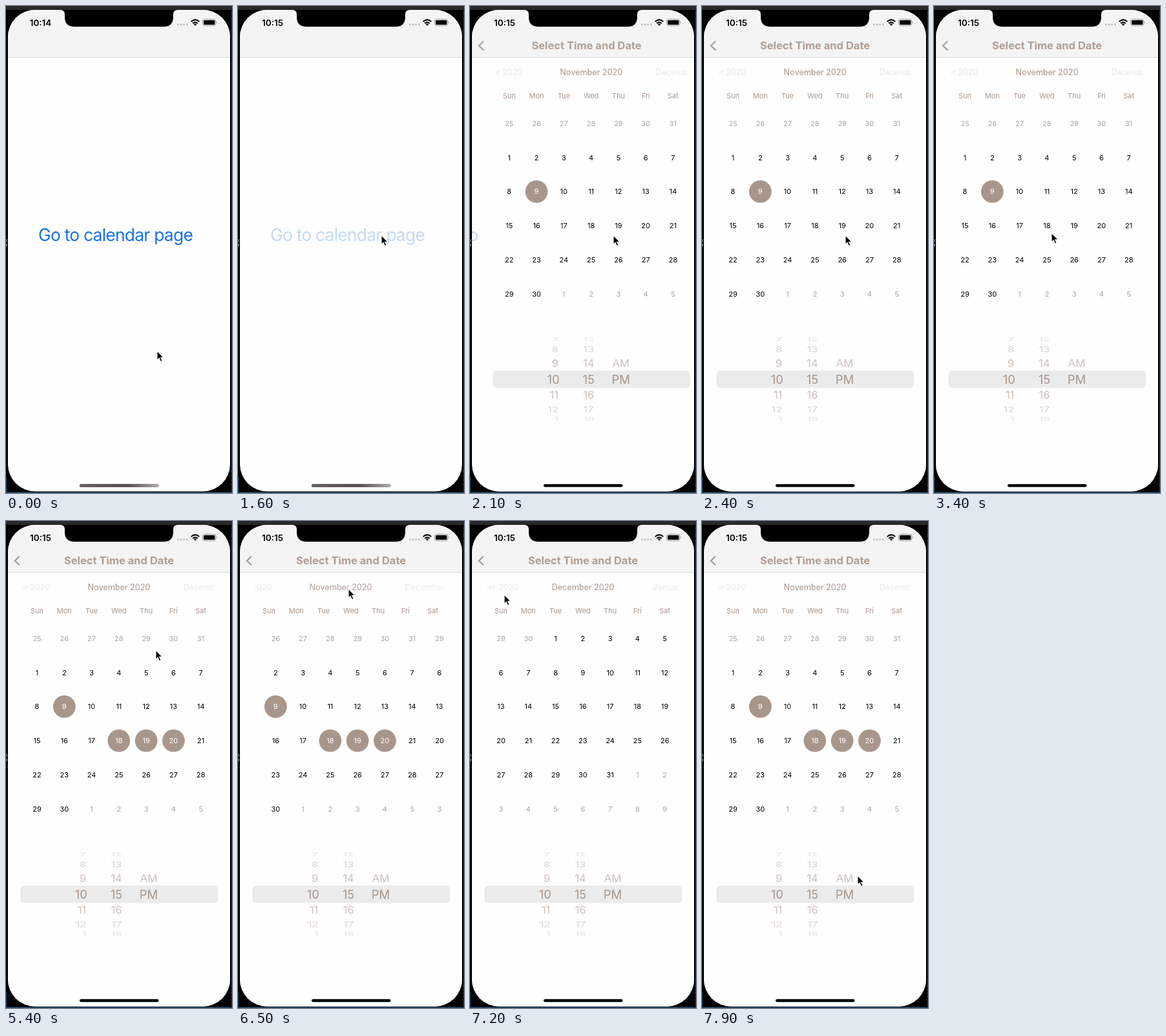
An HTML page for the animation above (8000 ms loop, 350 by 754 pixels).

```html
<!DOCTYPE html>
<html lang="en">
<head>
<meta charset="utf-8">
<title>Calendar page</title>
<style>
html, body { margin: 0; width: 100%; height: 100%; overflow: hidden; background: #000; }
svg { display: block; width: 350px; height: 754px; }
text { font-family: Inter, Roboto, sans-serif; font-optical-sizing: none; }
</style>
</head>
<body>
<svg id="stage" viewBox="0 0 350 754" xmlns="http://www.w3.org/2000/svg">
  <defs>
    <clipPath id="screen"><rect x="3" y="6" width="344" height="745.5" rx="42"/></clipPath>
    <clipPath id="months"><rect x="27" y="90" width="296" height="400"/></clipPath>
    <linearGradient id="barFill">
      <stop offset="0" stop-color="#6a6263"/>
      <stop offset=".6" stop-color="#574f50"/>
      <stop offset="1" stop-color="#b5b1b1"/>
    </linearGradient>
  </defs>
  <rect width="350" height="754"/>
  <rect width="350" height="6" fill="#292929"/>
  <rect y="752.5" width="350" height="1.5" fill="#234f70"/>
  <rect y="730" width="1" height="24" fill="#234f70"/>
  <path d="M1 361v4m0 3v4" stroke="#aaa"/>
  <path d="M349.5 6V752" stroke="#333"/>
  <g clip-path="url(#screen)">
    <rect x="3" y="6" width="344" height="747" fill="#fefefe"/>
    <g id="home"></g>
    <g id="calendar"><rect x="3" y="79" width="344" height="674" fill="#fefefe"/></g>
    <rect x="3" y="6" width="344" height="73" fill="#f4f4f4"/>
    <path d="M3 79.5H347" stroke="#d9d9d9"/>
    <path id="back" d="M21 54.5L14 61.5L21 68.5" fill="none" stroke="#a0958f" stroke-width="2"/>
    <g id="title"></g>
    <path d="M84 6Q91 6 91 13V17Q91 32 106 32H244Q259 32 259 17V13Q259 6 266 6Z"/>
    <g id="status">
      <g fill="none" stroke="#000" stroke-width="2.2">
        <path d="M286.8 24.2Q293 18.6 299.2 24.2"/>
        <path d="M289.3 27Q293 23.8 296.7 27"/>
      </g>
      <path d="M290.7 28.3Q293 26.6 295.3 28.3L293 30.8Z"/>
      <rect x="304.5" y="20.5" width="20.5" height="10" rx="3" fill="none" stroke="#999"/>
      <rect x="306" y="22" width="17.5" height="7" rx="1.6"/>
      <path d="M326.2 23.7Q328 25.5 326.2 27.3Z" fill="#999"/>
    </g>
    <rect id="bar" x="114" y="740.3" width="122.5" height="4.4" rx="2.2"/>
    <rect id="barTint" x="114" y="740.3" width="122.5" height="4.4" rx="2.2" fill="url(#barFill)"/>
  </g>
  <path id="pointer" d="M0 0V14.2L3.2 11.3L5.5 16.7L8 15.6L5.7 10.4H10.2Z" stroke="#fff" stroke-width="1.1"/>
</svg>
<script>
const LOOP = 8000, STEP = 100;
const BROWN = '#a9968b', PAGE = 296, COL = PAGE / 7, ROW = 52.7;
const $ = id => document.getElementById(id);

function el(tag, attrs, parent, text) {
  const node = document.createElementNS('http://www.w3.org/2000/svg', tag);
  for (const k in attrs) node.setAttribute(k, attrs[k]);
  if (text !== undefined) node.textContent = text;
  return parent.appendChild(node);
}
const label = (parent, text, x, y, size, fill, more) =>
  el('text', { x, y, 'font-size': size, fill, 'text-anchor': 'middle', ...more }, parent, text);
const move = (node, x, y = 0) => node.setAttribute('transform', `translate(${x} ${y})`);
const fade = (node, a) => node.setAttribute('opacity', a);
const clamp = v => Math.max(0, Math.min(1, v));

// Linear keys: [time, ...values]
function at(keys, t) {
  let i = 0;
  while (i < keys.length - 2 && t >= keys[i + 1][0]) i++;
  const [t0, ...a] = keys[i], [t1, ...b] = keys[i + 1];
  const k = clamp((t - t0) / (t1 - t0));
  return a.map((v, j) => v + (b[j] - v) * k);
}

// Home page, navigation and status bar
const link = label($('home'), 'Go to calendar page', 169.5, 363.7, 26.5, '#1a73e0', { 'letter-spacing': -0.8 });
label($('title'), 'Select Time and Date', 175, 66.5, 16.5, '#b09d92', { 'font-weight': 700 });
const clock = label($('status'), '', 53.5, 30.5, 13.5, '#000', { 'font-weight': 600 });
for (let i = 0; i < 4; i++) el('circle', { cx: 266.5 + i * 4.6, cy: 28.7, r: 1.4, fill: '#bbb' }, $('status'));

// Month header and weekdays
const calendar = $('calendar');
const clipped = el('g', { 'clip-path': 'url(#months)' }, calendar);
const heads = el('g', {}, clipped);
const names = ['October 2020', 'November 2020', 'December 2020', 'January 2021'].map((name, i) =>
  label(heads, name, 175 + (i - 1) * PAGE / 2, 107.3, 12.8, BROWN, { 'letter-spacing': -0.1 }));
const colX = c => 48 + c * COL;
['Sun', 'Mon', 'Tue', 'Wed', 'Thu', 'Fri', 'Sat'].forEach((d, c) =>
  label(calendar, d, colX(c), 143, 11, BROWN));

// Day grid, two month pages side by side
const days = el('g', {}, clipped);
const picks = { 9: -1000, 18: 4000, 19: 4600, 20: 5100 };
const marks = [];
[[10, -6], [11, -1]].forEach(([month, first], page) => {
  for (let i = 0; i < 42; i++) {
    const date = new Date(2020, month, first + i + 0);
    const x = colX(i % 7) + page * PAGE, y = 182 + Math.floor(i / 7) * ROW;
    const inside = date.getMonth() === month, n = date.getDate();
    const start = page === 0 && inside ? picks[n] : undefined;
    let disc;
    if (start !== undefined) disc = el('circle', { cx: x, cy: y, r: 17.4, fill: BROWN }, days);
    const text = label(days, n, x, y + 4, 11, inside ? '#000' : '#a5a5a5');
    if (disc) marks.push({ disc, text, start });
  }
});

// Time picker drum
el('rect', { x: 22.5, y: 564.5, width: 305.5, height: 27, rx: 6, fill: '#ebebeb' }, calendar);
function drumRow(text, x, i, anchor) {
  const angle = i * 0.375;
  label(calendar, text, 0, 0, i ? 16.5 : 18.5, BROWN, {
    dy: '.36em', 'text-anchor': anchor,
    opacity: [1, 0.58, 0.42, 0.28][Math.abs(i)],
    transform: `translate(${x} ${578 + 68 * Math.sin(angle)}) scale(1 ${Math.cos(angle)})`
  });
}
for (let i = -3; i <= 3; i++) {
  drumRow((9 + i) % 12 + 1, i ? 124.3 : 126, i, 'end');
  drumRow(15 + i, 171, i, 'middle');
}
drumRow('AM', 221, -1, 'middle');
drumRow('PM', 221, 0, 'middle');

const pointerKeys = [
  [200, 234, 534], [300, 206, 353], [400, 222, 385], [500, 222, 385], [600, 222, 370], [700, 222, 355],
  [2900, 222, 355], [3200, 196, 366], [3500, 175, 344], [4100, 175, 344], [4400, 219, 343],
  [4700, 219, 343], [4900, 250, 343], [5200, 257, 343], [5400, 232, 200], [5600, 203, 105],
  [6400, 203, 105], [6500, 171, 105], [6700, 75, 110], [6900, 53, 114], [7200, 53, 114],
  [7400, 180, 114], [7500, 224, 118], [7700, 238, 350], [7900, 241, 549]
];
const pageKeys = [
  [6400, 0], [6500, 32 / PAGE], [6600, 0.45], [6700, 0.8], [6800, 0.95], [7000, 1],
  [7200, 1], [7300, 0.82], [7400, 0.42], [7500, 0.14], [7600, 0.03], [7700, 0]
];
const popKeys = [[0, 0.5], [100, 1.15], [200, 1]];

function draw(time) {
  const t = Math.floor(time / STEP) * STEP;

  clock.textContent = t < 1200 ? '10:14' : '10:15';
  fade(link, t < 1600 ? 1 : 0.25);

  const push = 1 - Math.pow(1 - clamp((t - 1650) / 700), 3.2);
  move($('home'), -105 * push);
  move(calendar, 344 * (1 - push));
  move($('title'), 150 * (1 - push));
  fade($('title'), push);
  fade($('back'), push);
  fade($('barTint'), 1 - push);

  const [page] = at(pageKeys, t);
  move(days, -page * PAGE);
  move(heads, -page * PAGE / 2);
  names.forEach((n, i) => fade(n, Math.max(0.2, 1 - Math.abs(i - 1 - page))));

  for (const { disc, text, start } of marks) {
    const on = t >= start;
    disc.setAttribute('r', on ? 17.4 * at(popKeys, t - start)[0] : 0);
    text.setAttribute('fill', on ? '#fff' : '#000');
  }
  move($('pointer'), ...at(pointerKeys, t));
}

const begin = performance.now();
function frame() {
  draw((performance.now() - begin) % LOOP);
  requestAnimationFrame(frame);
}
frame();
</script>
</body>
</html>
```
